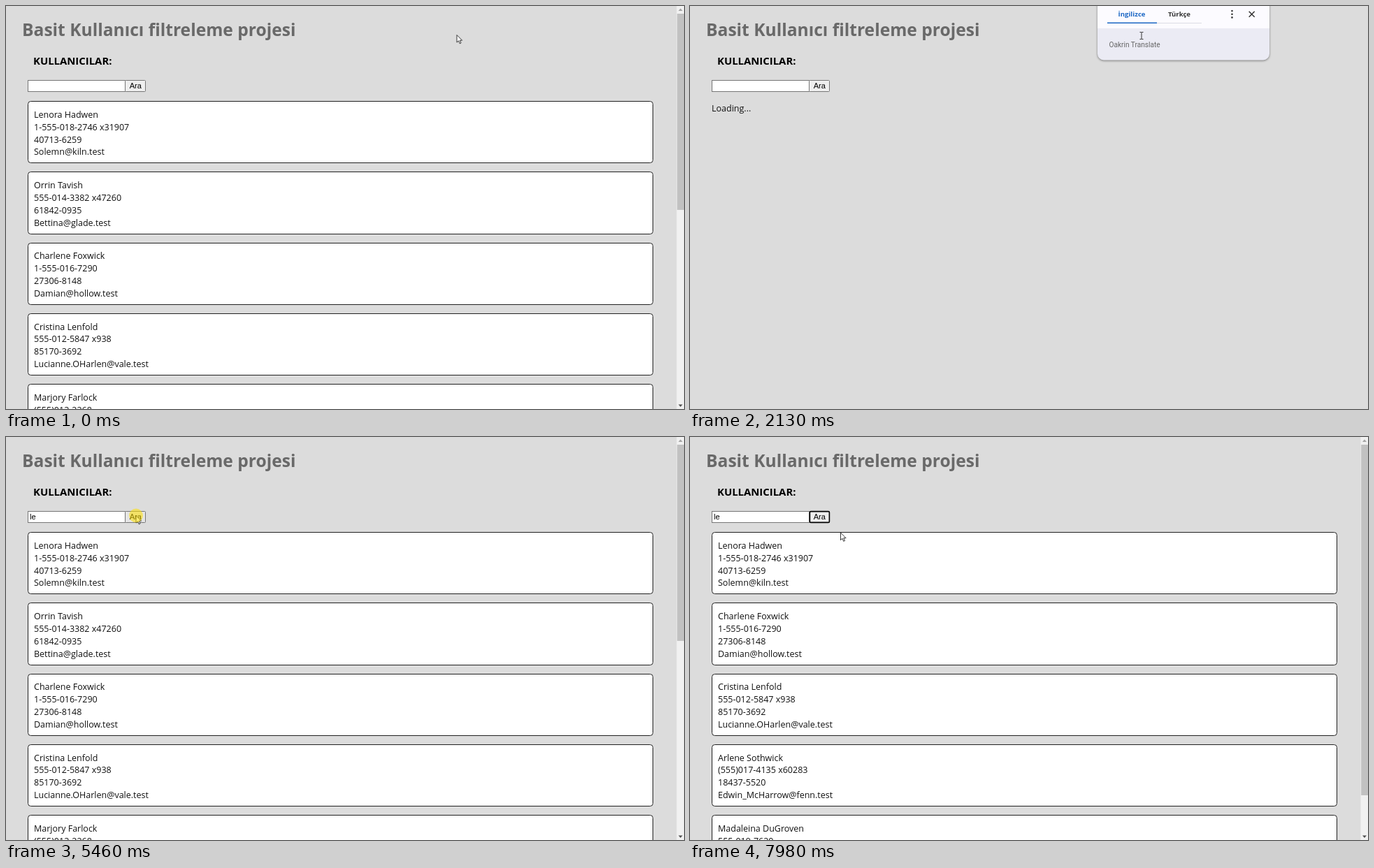
Animation, 970 px wide and 577 px high, one loop 8 s. Source, as an HTML page:

```html
<!DOCTYPE html>
<html lang="tr">
<head>
<meta charset="utf-8">
<title>Kullanıcı filtreleme</title>
<style>
  html, body { margin: 0; width: 100%; height: 100%; overflow: hidden; background: #dcdcdc; }
  svg { display: block; font: 12.5px "Open Sans", sans-serif; fill: #111; }
  .title { font-size: 24.6px; font-weight: 700; fill: #696969; }
  .heading { font-size: 14.9px; font-weight: 700; fill: #000; }
  .control { font: 11.1px "Liberation Sans", Arial, sans-serif; fill: #000; }
  .card { fill: #fff; stroke: #222; }
  .field { stroke: #767676; }
  .ring { fill: none; stroke: #000; stroke-width: 1.6; }
  .floating { filter: drop-shadow(0 1px 1.5px rgba(0, 0, 0, .45)); }
  .tab { font-size: 9.6px; font-weight: 700; }
</style>
</head>
<body>
<svg width="970" height="577" viewBox="0 0 970 577">
  <g id="page">
    <text class="title" x="23" y="43">Basit Kullanıcı filtreleme projesi</text>
    <text class="heading" x="39" y="84">KULLANICILAR:</text>
    <rect class="field" x="31.5" y="106.5" width="139" height="16" fill="#fff"/>
    <rect class="field" id="button" x="170.5" y="106.5" width="29" height="16" rx="1"/>
    <text class="control" x="185.3" y="118" text-anchor="middle">Ara</text>
    <text class="control" id="query" x="34" y="118"></text>
    <rect id="caret" y="108" width="1" height="13" fill="#000"/>
    <rect class="ring" id="inputRing" x="31.6" y="106.6" width="138" height="15.8" rx="1.5"/>
    <rect class="ring" id="buttonRing" x="171.4" y="106.6" width="28" height="15.8" rx="1.5"/>
    <text id="loading" x="31" y="151">Loading...</text>
    <g id="allCards"></g>
    <g id="foundCards"></g>
  </g>
  <g id="scrollbar">
    <rect x="959.5" width="10.5" height="577" fill="#f1f1f1"/>
    <rect id="thumb" x="960.2" width="9.8" fill="#c1c1c1"/>
    <path id="arrowUp" d="M962 7h6l-3-3.5z"/>
    <path id="arrowDown" d="M962 570.5h6l-3 3.5z"/>
  </g>
  <g id="dialog" class="floating">
    <rect x="299.5" y="-60" width="372" height="169" rx="9" fill="#fcfafe" stroke="#c4c4c8"/>
    <text x="317.5" y="20" font-size="12.4" font-weight="500" fill="#333">devserver:4100 web sitesinin mesajı</text>
    <text x="317" y="44" font-size="10.1" fill="#666">hata yapildi</text>
    <rect x="589" y="61" width="67" height="33.5" rx="16.7" fill="#fff" stroke="#4668a4" stroke-width="1.7"/>
    <rect x="592" y="64" width="61" height="27.5" rx="13.7" fill="#3f5e96"/>
    <text x="622.5" y="81" font-size="10.5" fill="#fff" text-anchor="middle">Tamam</text>
  </g>
  <g id="popup" class="floating">
    <rect x="583" y="-30" width="246" height="107.5" rx="9" fill="#ebebf4"/>
    <path d="M583 32V-30H829V32Z" fill="#fcfbff"/>
    <path d="M668 24.5H732" stroke="#dcdce4"/>
    <path d="M597 24.2H668" stroke="#1a66c4" stroke-width="1.6"/>
    <text class="tab" x="632" y="15" fill="#1a66c4" text-anchor="middle">İngilizce</text>
    <text class="tab" x="700" y="15" fill="#333" text-anchor="middle">Türkçe</text>
    <path d="M775.5 7v0M775.5 11.7v0M775.5 16.4v0" stroke="#333" stroke-width="2.6" stroke-linecap="round"/>
    <path d="M799.7 7.7l8 8m0-8l-8 8" stroke="#333" stroke-width="1.5"/>
    <text x="599.5" y="59" font-size="10.1" font-family="Roboto, sans-serif" fill="#666">Oakrin Translate</text>
  </g>
  <path id="beam" d="M643.5 37.5h2l.5.5.5-.5h2M646 38v9M643.5 47.5h2l.5-.5.5.5h2" fill="none" stroke="#333"/>
  <path id="arrow" d="M0 0V10.6L2.5 8.3 4.2 12.3 6 11.5 4.3 7.7H7.6Z" fill="#fff" stroke="#222" stroke-width=".9"/>
  <circle id="click" r="10" fill="#ffe000" opacity=".55"/>
</svg>
<script>
const LOOP = 8000;
const users = [
  ['Lenora Hadwen', '1-555-018-2746 x31907', '40713-6259', 'Solemn@kiln.test'],
  ['Orrin Tavish', '555-014-3382 x47260', '61842-0935', 'Bettina@glade.test'],
  ['Charlene Foxwick', '1-555-016-7290', '27306-8148', 'Damian@hollow.test'],
  ['Cristina Lenfold', '555-012-5847 x938', '85170-3692', 'Lucianne.OHarlen@vale.test'],
  ['Marjory Farlock', '(555)013-2268'],
  ['Arlene Sothwick', '(555)017-4135 x60283', '18437-5520', 'Edwin_McHarrow@fenn.test'],
  ['Madaleina DuGroven', '555-019-7620', '70925-4486', 'Ida.Farbrook@moor.test'],
];
const el = Object.fromEntries([...document.querySelectorAll('[id]')].map(e => [e.id, e]));

// Borders sit on whole pixels, so top and bottom are snapped separately.
const card = (lines, i) => {
  const offset = 101.2 * i;
  const top = Math.floor(136.65 + offset), bottom = Math.floor(224.85 + offset);
  return `<rect class="card" x="31.5" y="${top + .5}" width="894" height="${bottom - top}" rx="4"/>` +
    lines.map((s, j) => `<text x="40" y="${Math.round(160 + offset + 17.8 * j)}">${s}</text>`).join('');
};
el.allCards.innerHTML = users.slice(0, 5).map(card).join('');
el.foundCards.innerHTML = users.filter(u => /le/i.test(u[0])).map(card).join('');

const within = (t, a, b) => t >= a && t < b;
const progress = (t, a, b) => Math.min(1, Math.max(0, (t - a) / (b - a)));
const smooth = u => u * u * (3 - 2 * u);
const easeOut = u => 1 - (1 - u) ** 2;
const show = (e, on) => e.setAttribute('visibility', on ? 'visible' : 'hidden');
const set = (e, attrs) => { for (const k in attrs) e.setAttribute(k, attrs[k]); };

// start, end, target x, target y, downward bulge
const moves = [
  [2600, 2820, 559, 68, 0],
  [4450, 5120, 186, 112.5, 0],
  [5860, 6580, 248, 106, 14],
  [7540, 7980, 215.5, 137, 0],
];
function pointer(t) {
  let x = 645, y = 41.5;
  for (const [a, b, tx, ty, bulge] of moves) {
    const u = smooth(progress(t, a, b));
    x += (tx - x) * u;
    y += (ty - y) * u + bulge * Math.sin(Math.PI * u);
  }
  return [x, y];
}

function render(t) {
  const loading = within(t, 1370, 2200), found = t >= 5520;
  const scroll = Math.round(61 * (easeOut(progress(t, 6950, 7180)) - easeOut(progress(t, 7300, 7530))));
  set(el.page, { transform: `translate(0 ${-scroll})` });
  show(el.loading, loading);
  show(el.allCards, !loading && !found);
  show(el.foundCards, found);

  const height = found ? 638 : 1140;
  show(el.scrollbar, !loading);
  set(el.thumb, { y: 11 + 555 * scroll / height, height: 555 * 577 / height });
  set(el.arrowUp, { fill: scroll ? '#505050' : '#a3a3a3' });
  set(el.arrowDown, { fill: scroll < height - 577 ? '#505050' : '#a3a3a3' });

  const typed = t < 3550 ? 0 : t < 3950 ? 1 : 2;
  el.query.textContent = 'le'.slice(0, typed);
  set(el.caret, { x: [34, 36.5, 42][typed] });
  show(el.caret, within(t, 2750, 3020) || within(t, 3480, 4410) || within(t, 4940, 5460));
  show(el.inputRing, within(t, 2750, 5460));
  show(el.buttonRing, found);

  const dialog = smooth(progress(t, 1510, 1710)) - smooth(progress(t, 1930, 2130));
  set(el.dialog, { opacity: dialog, transform: `translate(0 ${-30 * (1 - dialog)})` });
  const popup = progress(t, 1440, 1640) - progress(t, 2310, 2510);
  set(el.popup, { opacity: popup, transform: `translate(706 41) scale(${.94 + .06 * popup}) translate(-706 -41)` });

  const [x, y] = pointer(t), beam = within(t, 1370, 2600);
  show(el.beam, beam);
  show(el.arrow, !beam);
  set(el.arrow, { transform: `translate(${x} ${y})` });
  set(el.click, { cx: x, cy: y });
  show(el.click, within(t, 500, 570) || within(t, 5460, 5520));
  const hover = within(x, 170, 200) && within(y + scroll, 106, 123);
  set(el.button, { fill: hover ? '#e5e5e5' : '#efefef' });
}

const start = performance.now();
function tick() {
  render((performance.now() - start) % LOOP);
  requestAnimationFrame(tick);
}
tick();
</script>
</body>
</html>
```
